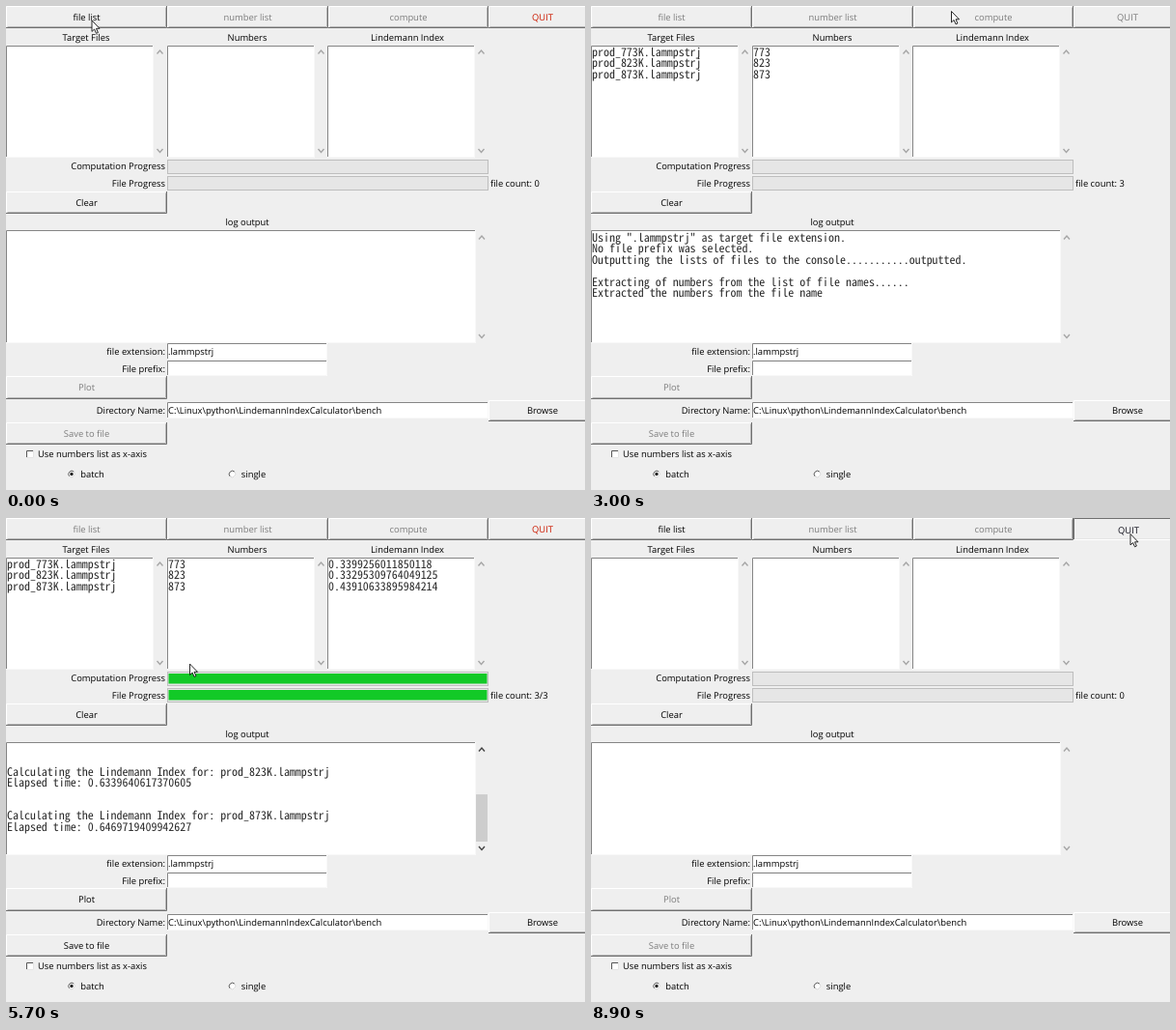
Recreate the animation shown at these times as an HTML page. Size 600 by 501 pixels, loop 9000 ms.

```html
<!DOCTYPE html>
<html lang="en">
<head>
<meta charset="utf-8">
<title>Lindemann index calculator</title>
<style>
html, body { margin: 0; width: 100%; height: 100%; overflow: hidden; background: #efefef; }
svg { display: block; width: 600px; height: 501px; text-rendering: geometricPrecision; }
text { font-family: "Open Sans", "Noto Sans", sans-serif; font-size: 9.4px; }
.mono text { font-family: "Noto Sans Mono CJK JP", "Liberation Mono", monospace; fill: #2a2a2a; }
</style>
</head>
<body>
<svg id="stage" viewBox="0 0 600 501"></svg>
<script>
const LOOP = 9000, STEP = 100;
const ROW = 11.4, ROWS = 10;
const OFF = '#7c7c7c', ON = '#000', RED = '#cc1a00';
const stage = document.getElementById('stage');

function add(tag, attrs, parent = stage) {
  const node = document.createElementNS('http://www.w3.org/2000/svg', tag);
  set(node, attrs);
  parent.appendChild(node);
  return node;
}

function set(node, attrs) {
  for (const key in attrs) node.setAttribute(key, attrs[key]);
}

function label(text, x, mid, anchor = 'start') {
  const node = add('text', { x, y: mid + 3.2, 'text-anchor': anchor });
  node.textContent = text;
  return node;
}

function edges(x, y, w, h) {
  const r = x + w - .5, b = y + h - .5;
  const line = d => add('path', { d, fill: 'none' });
  return [
    line(`M${x + .5} ${b}V${y + .5}H${r}`),
    line(`M${x + 1.5} ${b - 1}H${r - 1}V${y + 1.5}`),
    line(`M${x} ${b}H${r}V${y}`)
  ];
}

function shade(lines, colors) {
  lines.forEach((line, i) => line.setAttribute('stroke', colors[i]));
}

function button(text, x, y, w, h) {
  const lines = edges(x, y, w, h);
  const cx = x + w / 2, mid = y + h / 2 + .2;
  const caption = label(text, cx, mid, 'middle');
  return (color, pressed) => {
    shade(lines, pressed ? ['#707070', '#e6e6e6', '#fff'] : ['#fff', '#b4b4b4', '#707070']);
    const d = pressed ? 1 : 0;
    set(caption, { x: cx + d, y: mid + 3.2 + d, fill: color });
  };
}

function field(x, y, w, h) {
  add('rect', { x, y, width: w, height: h, fill: '#fff' });
  shade(edges(x, y, w, h), ['#858585', '#fff', '#f8f8f8']);
}

function chevrons(x, top, bottom) {
  return add('path', {
    d: `M${x - 3} ${top + 2}l3 -3.4l3 3.4M${x - 3} ${bottom - 2}l3 3.4l3 -3.4`,
    fill: 'none', stroke: '#a6a6a6', 'stroke-width': 1.4
  });
}

function progress(y) {
  add('rect', { x: 167.5, y: y + .5, width: 332, height: 14, fill: '#e6e6e6', stroke: '#bebebe' });
  const fill = add('rect', { x: 168.5, y: y + 2, height: 10.5, fill: '#12c927' });
  return part => fill.setAttribute('width', 330 * part);
}

function radio(x, y, name) {
  add('circle', { cx: x, cy: y, r: 3.6, fill: '#fff' });
  add('path', {
    d: `M${x - 2.4} ${y + 2.4}A3.4 3.4 0 0 1 ${x + 2.4} ${y - 2.4}`,
    fill: 'none', stroke: '#555'
  });
  add('path', {
    d: `M${x - 2.4} ${y + 2.4}A3.4 3.4 0 0 0 ${x + 2.4} ${y - 2.4}`,
    fill: 'none', stroke: '#d8d8d8'
  });
  label(name, x + 9.3, y);
}

// Size the fixed-width face by its own advance: 5.98 px per character.
const monoFace = '"Noto Sans Mono CJK JP", "Liberation Mono", monospace';
const pen = document.createElement('canvas').getContext('2d');
pen.font = '100px ' + monoFace;
const monoSize = 5.98 / (pen.measureText('0').width / 100);

function lines(x, y, count) {
  const group = add('g', { class: 'mono' });
  const rows = Array.from({ length: count }, (_, i) => {
    const row = add('text', { x, y: y + i * ROW }, group);
    row.style.fontSize = monoSize + 'px';
    return row;
  });
  return texts => rows.forEach((row, i) => write(row, texts[i] || ''));
}

function write(node, text) {
  if (node.textContent !== text) node.textContent = text;
}

// Window layout
add('rect', { width: 600, height: 501, fill: '#efefef' });

const fileBtn = button('file list', 0, 0, 167, 23);
const numberBtn = button('number list', 167, 0, 167, 23);
const computeBtn = button('compute', 334, 0, 166, 23);
const quitBtn = button('QUIT', 500, 0, 112, 23);

const [showFiles, showNumbers, showIndices] =
  ['Target Files', 'Numbers', 'Lindemann Index'].map((title, i) => {
    const x = Math.round(i * 166.6);
    label(title, x + 83, 32.5, 'middle');
    field(x, 41, 153, 116);
    chevrons(x + 159.5, 47.5, 150);
    return lines(x + 1, 52, 3);
  });

label('Computation Progress', 165, 166, 'end');
label('File Progress', 165, 183.5, 'end');
const stepBar = progress(159);
const fileBar = progress(176);
const count = label('', 502, 183.5);
const clearBtn = button('Clear', 0, 192, 167, 23);

label('log output', 250, 224, 'middle');
field(0, 232, 487, 117);
const showLog = lines(1, 244, ROWS);
const logArrows = chevrons(493, 239.5, 342);
const thumb = add('rect', { x: 487, width: 12, fill: '#cdcdcd' });

label('file extension:', 165, 358, 'end');
label('File prefix:', 165, 375.5, 'end');
field(167, 349, 166, 17);
field(167, 367, 166, 16);
label('.lammpstrj', 168, 358);

const plotBtn = button('Plot', 0, 383, 167, 24);
label('Directory Name:', 165, 418.5, 'end');
field(167, 410, 333, 17);
label('C:\\Linux\\python\\LindemannIndexCalculator\\bench', 168, 418.5);
button('Browse', 500, 408, 112, 22)(ON, false);
const saveBtn = button('Save to file', 0, 431, 167, 23);

add('rect', { x: 21, y: 460, width: 8, height: 8, fill: '#fff' });
shade(edges(21, 460, 8, 8), ['#555', '#fff', '#e4e4e4']);
label('Use numbers list as x-axis', 33, 464);
radio(68, 484.5, 'batch');
radio(234.5, 484.5, 'single');
add('circle', { cx: 68, cy: 484.5, r: 1.7, fill: '#222' });

const cursor = add('path', {
  d: 'M0 0V11.4L2.6 9L4.5 13.3L6.4 12.5L4.5 8.3H8Z',
  fill: '#fff', stroke: '#111', 'stroke-width': .9
});

// Data
const temps = [773, 823, 873];
const files = temps.map(k => `prod_${k}K.lammpstrj`);
const indices = ['0.3399256011850118', '0.33295309764049125', '0.43910633895984214'];
const elapsed = ['0.6390364170074463', '0.6339640617370605', '0.6469719409942627'];
const log = [
  'Using ".lammpstrj" as target file extension.',
  'No file prefix was selected.',
  'Outputting the lists of files to the console...........outputted.',
  '',
  'Extracting of numbers from the list of file names......',
  'Extracted the numbers from the file name',
  ...files.flatMap((f, i) =>
    [`Calculating the Lindemann Index for: ${f}`, `Elapsed time: ${elapsed[i]}`, '', ''])
];

// Pointer track: time, x, y, and 1 where the move to the next point is eased
const track = [
  [0, 89, 15], [1000, 89, 15], [1100, 157, 8], [1200, 205, 10], [1300, 235, 16], [1400, 247, 19],
  [2100, 247, 19], [2200, 276, 7], [2400, 340, 5], [2600, 373.5, 5.5],
  [5300, 373.5, 5.5, 1], [5900, 126.5, 202],
  [7400, 126.5, 202, 1], [8000, 406, 116],
  [8200, 406, 116, 1], [8700, 559, 16.5], [LOOP, 559, 16.5]
];

function pointer(t) {
  const i = track.findIndex(key => key[0] > t);
  const [t0, x0, y0, eased] = track[i - 1], [t1, x1, y1] = track[i];
  let p = (t - t0) / (t1 - t0);
  if (eased) p = p * p * (3 - 2 * p);
  return [x0 + (x1 - x0) * p, y0 + (y1 - y0) * p];
}

// Value of the last [time, value] pair that has begun
const at = (t, ...pairs) => pairs.reduce((v, [start, next]) => t >= start ? next : v, 0);
const within = (t, a, b) => t >= a && t < b;

function draw(t) {
  const listed = within(t, 400, 7100);
  const numbered = within(t, 1800, 7100);
  const busy = within(t, 3000, 5000);
  const finished = within(t, 5000, 7100);
  const done = at(t, [3600, 1], [4300, 2], [5000, 3], [7100, 0]);
  const quitting = t >= 8800;

  fileBtn(listed ? OFF : ON, within(t, 200, 400));
  numberBtn(listed && !numbered ? ON : OFF, within(t, 1600, 1800));
  computeBtn(listed && t < 3000 ? ON : OFF, within(t, 2800, 3000));
  quitBtn(busy ? OFF : quitting ? '#10101c' : RED, quitting);
  clearBtn(ON, within(t, 6800, 7100));
  plotBtn(finished ? ON : OFF, false);
  saveBtn(finished ? ON : OFF, false);

  showFiles(listed ? files : []);
  showNumbers(numbered ? temps.map(String) : []);
  showIndices(indices.slice(0, done));
  stepBar(at(t, [4400, .3], [4500, .6], [4900, .928], [5000, 1], [7100, 0]));
  fileBar(done / 3);
  write(count, 'file count: ' + (done ? done + '/3' : listed ? 3 : 0));

  const total = at(t, [400, 3], [1800, 6], [3600, 8], [4300, 16], [5000, 18], [7100, 0]);
  const top = at(t, [4300, 4], [5000, 8], [7100, 0]);
  const scrolls = total > ROWS;
  showLog(log.slice(0, total).slice(top, top + ROWS));
  logArrows.setAttribute('stroke', scrolls ? '#444' : '#a6a6a6');
  set(thumb, {
    y: 247 + (scrolls ? 88 * top / total : 0),
    height: scrolls ? 88 * ROWS / total : 0
  });

  cursor.setAttribute('transform', `translate(${pointer(t)})`);
}

function tick() {
  const t = performance.now() % LOOP;
  draw(Math.floor(t / STEP) * STEP);
  requestAnimationFrame(tick);
}
tick();
</script>
</body>
</html>
```
